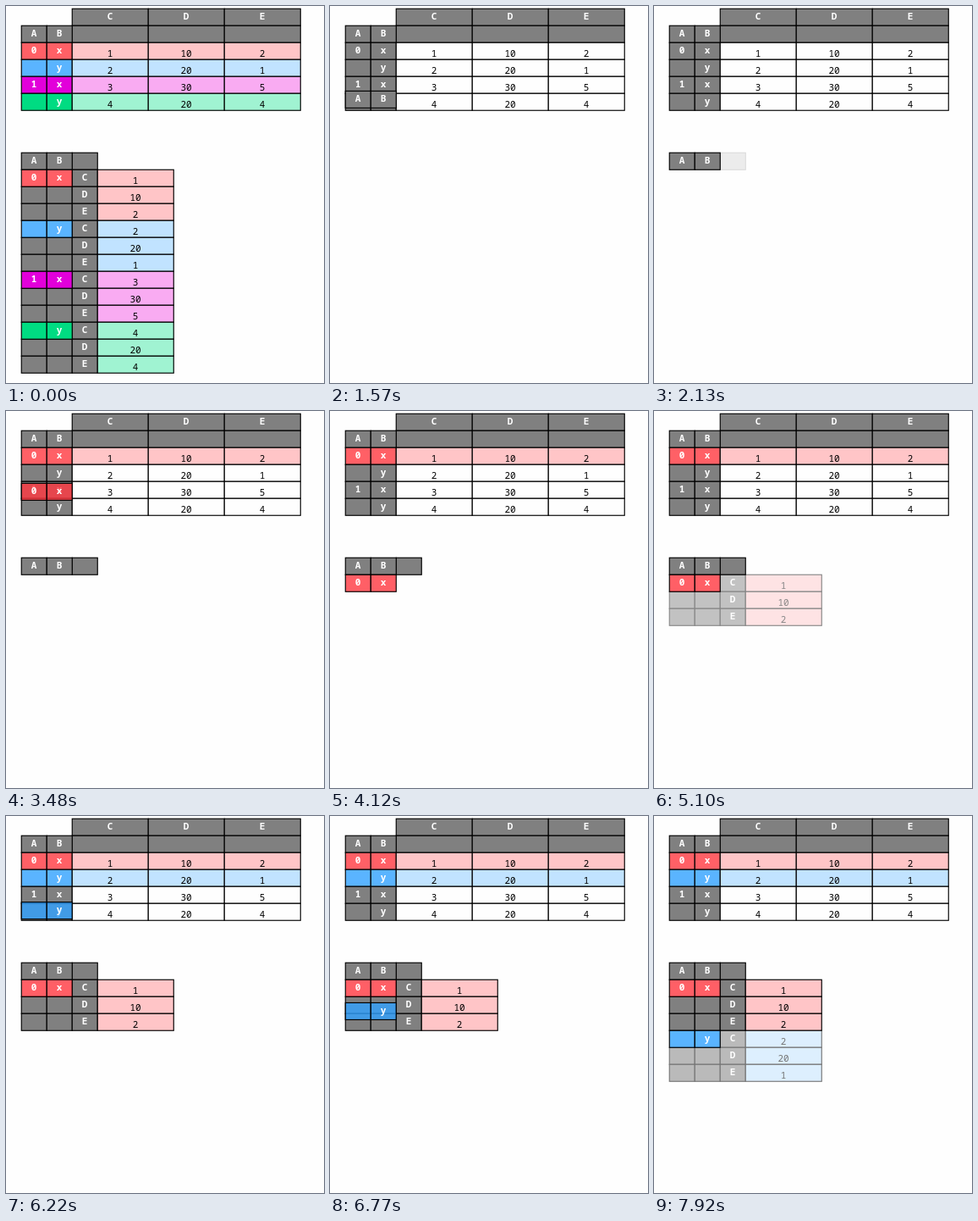
Animation, 376 px wide and 445 px high, one loop 8 s. Source, as an HTML page:

```html
<!DOCTYPE html>
<html lang="en">
<head>
<meta charset="utf-8">
<title>Stacking a table</title>
<style>
  html, body { margin: 0; width: 100%; height: 100%; overflow: hidden; background: #fefefe; }
  svg { display: block; width: 376px; height: 445px; }
  rect { stroke: #000; stroke-width: 1.15; }
  text { font: 11px "Noto Sans Mono", "DejaVu Sans Mono", monospace; text-anchor: middle; fill: #000; }
  .head { font-weight: 600; fill: #fff; }
</style>
</head>
<body>
<svg id="stage" viewBox="0 0 376 445"></svg>
<script>
const NS = "http://www.w3.org/2000/svg";
const stage = document.getElementById("stage");
const LOOP = 8000, GRAY = "#808080", ROW = 20, TOP = 43, STACK = 193;
const COLS = ["C", "D", "E"];
const ROWS = [
  { index: ["0", "x"], values: [1, 10, 2], dark: "#ff6066", light: "#ffc5c7", glass: "rgba(255,56,64,.8)" },
  { index: ["", "y"], values: [2, 20, 1], dark: "#5ab4ff", light: "#c1e3ff", glass: "rgba(49,162,255,.8)" },
  { index: ["1", "x"], values: [3, 30, 5], dark: "#e200da", light: "#f9abf2" },
  { index: ["", "y"], values: [4, 20, 4], dark: "#00dc82", light: "#a0f3d2" }
];

function add(parent, tag, attrs = {}) {
  const node = document.createElementNS(NS, tag);
  for (const key in attrs) node.setAttribute(key, attrs[key]);
  return parent.appendChild(node);
}

function group(parent = stage) { return add(parent, "g"); }

function cell(parent, x, y, width, label, fill, head = true) {
  const box = add(parent, "rect", { x: x + .25, y: y + .25, width, height: ROW, fill });
  if (label !== "") {
    const text = add(parent, "text", { x: x + width / 2, y: y + (head ? 12.5 : 17) });
    if (head) text.setAttribute("class", "head");
    text.textContent = label;
  }
  return box;
}

function pair(parent, y, labels, fill) {
  return labels.map((label, i) => cell(parent, 18 + i * 30, y, 30, label, fill));
}

// wide table
const table = group();
COLS.forEach((name, i) => {
  cell(table, 78 + i * 90, 3, 90, name, GRAY);
  cell(table, 78 + i * 90, 23, 90, "", GRAY);
});
pair(table, 23, ["A", "B"], GRAY);
const tableRows = ROWS.map((row, r) => {
  const y = TOP + r * ROW;
  return {
    index: pair(table, y, row.index, GRAY),
    values: row.values.map((v, i) => cell(table, 78 + i * 90, y, 90, v, "#fefefe", false))
  };
});

// stacked table
const corner = group();
cell(corner, 78, 173, 30, "", GRAY);
const stacks = ROWS.map((row, r) => {
  const body = group();
  COLS.forEach((name, i) => {
    const y = STACK + (r * 3 + i) * ROW;
    if (i) pair(body, y, ["", ""], GRAY);
    cell(body, 78, y, 30, name, GRAY);
    cell(body, 108, y, 90, row.values[i], row.light, false);
  });
  return body;
});

// travelling pieces, drawn at y = 0
const header = group();
pair(header, 0, ["A", "B"], GRAY);
const movers = ROWS.map(row => {
  const piece = group();
  pair(piece, 0, row.index, row.glass || row.dark);
  return piece;
});

function track(t, points) {
  if (t <= points[0][0]) return points[0][1];
  for (let i = 1; i < points.length; i++) {
    const [t0, v0] = points[i - 1], [t1, v1] = points[i];
    if (t < t1) return v0 + (v1 - v0) * (t - t0) / (t1 - t0);
  }
  return points[points.length - 1][1];
}

function fade(t, start, end, next) {
  if (t < start) return 0;
  if (t >= next) return 1;
  const step = (end - start) / 13;
  return Math.min(14, Math.floor((t - start) / step + .001) + 1) / 15;
}

function show(node, opacity) {
  node.setAttribute("visibility", opacity > 0 ? "visible" : "hidden");
  node.setAttribute("opacity", opacity);
}

function place(node, y, visible) {
  show(node, visible ? 1 : 0);
  node.setAttribute("transform", `translate(0 ${y.toFixed(2)})`);
}

const PATHS = [
  [[3250, 48.6], [3670, 115], [4050, 177], [4120, 193]],
  [[6020, 59.5], [6400, 138.7], [6790, 224.4], [6920, 253]]
];
const FADES = [[4690, 5460, 6020], [7480, 8245, 8800]];

function draw(t) {
  const full = t < 930;
  ROWS.forEach((row, r) => {
    const path = PATHS[r];
    const lit = full || (path && t >= path[0][0]);
    const slot = STACK + r * 3 * ROW;
    tableRows[r].index.forEach(box => box.setAttribute("fill", lit ? row.dark : GRAY));
    tableRows[r].values.forEach(box => box.setAttribute("fill", lit ? row.light : "#fefefe"));
    place(movers[r], full || !path ? slot : track(t, path), lit);
    show(stacks[r], full ? 1 : FADES[r] ? fade(t, ...FADES[r]) : 0);
  });
  const y = full ? 173 : track(t, [[1110, 26], [1340, 63], [1900, 153], [2010, 173]]);
  place(header, y, full || t >= 1110);
  show(corner, full ? 1 : fade(t, 2040, 2710, 2711));
}

const begin = performance.now();
function tick() {
  draw((performance.now() - begin) % LOOP);
  requestAnimationFrame(tick);
}
draw(0);
requestAnimationFrame(tick);
</script>
</body>
</html>
```
